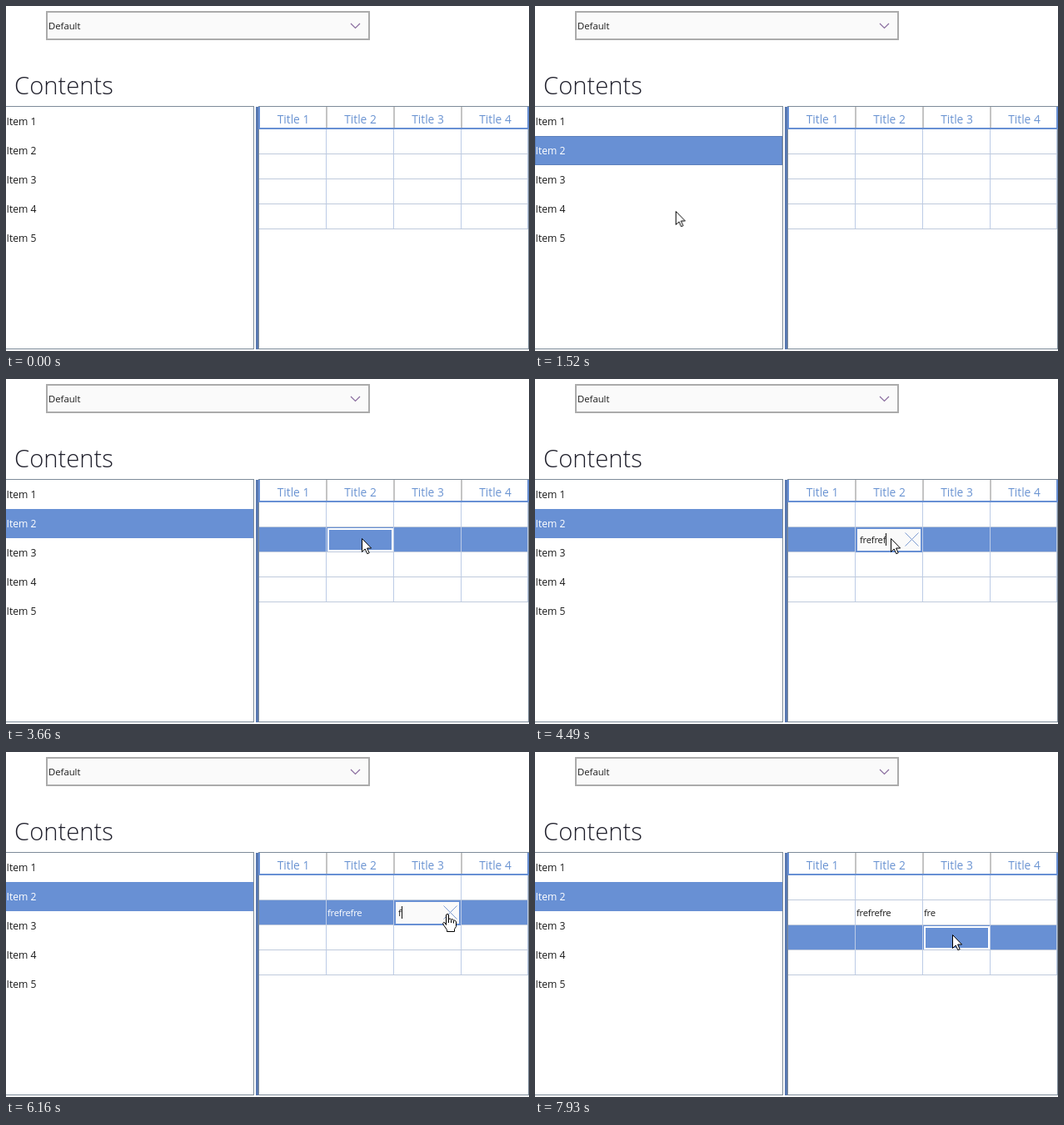
Recreate the animation shown at these times as an HTML page. Size 628 px wide and 414 px high, loop 8000 ms.

```html
<!DOCTYPE html>
<html lang="en">
<head>
<meta charset="utf-8">
<title>List and grid</title>
<style>
html, body { margin: 0; width: 100%; height: 100%; overflow: hidden; background: #fff; }
body { position: relative; font: 11.3px "Open Sans", "Noto Sans", sans-serif; }
svg { position: absolute; left: 0; top: 0; overflow: visible; }
text { fill: #1c1c1c; }
rect { shape-rendering: crispEdges; }
.lines { fill: none; stroke-width: 1; shape-rendering: crispEdges; }
.h1 { font-size: 29.2px; font-weight: 300; fill: #20202c; }
.item text { font-size: 12.2px; }
.head { font-size: 13.8px; fill: #6b94d2; text-anchor: middle; }
.cell { letter-spacing: -.25px; }
.blue { fill: #6890d4; }
.light text { fill: #fff; }
.focus { fill: none; stroke: #fff; stroke-width: 2; }

/* every state shares one 8 s clock */
.state { opacity: 0; animation: 8s step-end infinite; }
.item3 { animation-name: item3; }
.item2 { animation-name: item2; }
.ring { animation-name: ring; }
.row2 { animation-name: row2; }
.row3 { animation-name: row3; }
.focus22 { animation-name: focus22; }
.focus32 { animation-name: focus32; }
.focus23 { animation-name: focus23; }
.focus33 { animation-name: focus33; }
.edit2 { animation-name: edit2; }
.edit3 { animation-name: edit3; }
.word2 { animation-name: word2; }
.word3 { animation-name: focus33; }
.hand { animation-name: hand; }
.arrow { animation-name: arrow; }

@keyframes item3 { 0% { opacity: 0 } 7.4% { opacity: 1 } 16.4%, 100% { opacity: 0 } }
@keyframes item2 { 0% { opacity: 0 } 16.4%, 100% { opacity: 1 } }
@keyframes ring { 0% { opacity: 1 } 43.5%, 100% { opacity: 0 } }
@keyframes row2 {
  0% { opacity: 0 } 43.5% { opacity: 1 } 62.1% { opacity: 0 }
  69.2% { opacity: 1 } 95.6%, 100% { opacity: 0 }
}
@keyframes row3 {
  0% { opacity: 0 } 62.1% { opacity: 1 } 69.2% { opacity: 0 } 95.6%, 100% { opacity: 1 }
}
@keyframes focus22 { 0% { opacity: 0 } 43.5% { opacity: 1 } 47.6%, 100% { opacity: 0 } }
@keyframes edit2 { 0% { opacity: 0 } 47.6% { opacity: 1 } 62.1%, 100% { opacity: 0 } }
@keyframes focus32 { 0% { opacity: 0 } 62.1% { opacity: 1 } 69.2%, 100% { opacity: 0 } }
@keyframes focus23 { 0% { opacity: 0 } 69.2% { opacity: 1 } 73.5%, 100% { opacity: 0 } }
@keyframes edit3 { 0% { opacity: 0 } 73.5% { opacity: 1 } 95.6%, 100% { opacity: 0 } }
@keyframes focus33 { 0% { opacity: 0 } 95.6%, 100% { opacity: 1 } }
@keyframes word2 {
  0% { opacity: 0; fill: #1c1c1c } 62.1% { opacity: 1; fill: #1c1c1c }
  69.2% { opacity: 1; fill: #fff } 95.6%, 100% { opacity: 1; fill: #1c1c1c }
}
@keyframes hand { 0% { opacity: 0 } 76.1% { opacity: 1 } 88.5%, 100% { opacity: 0 } }
@keyframes arrow {
  0% { opacity: 0 } .88% { opacity: 1 } 76.1% { opacity: 0 } 88.5%, 100% { opacity: 1 }
}

.editor {
  position: absolute; top: 178px; width: 80px; height: 30px; box-sizing: border-box;
  padding-left: 3px; border: 2px solid #6890d4; background: #fafafa;
  color: #1c1c1c; line-height: 25px; white-space: nowrap; letter-spacing: -.25px;
}
.editor i, .editor svg {
  font-style: normal;
  animation: type 8s step-end infinite;
  animation-delay: calc(var(--at) - 8s);
}
.editor svg { left: 57px; top: 4px; }
.editor b { display: inline-block; width: 1px; height: 15px; background: #111; vertical-align: -3px; }
@keyframes type {
  0% { font-size: 11.3px; opacity: 1 }
  50%, 100% { font-size: 0; opacity: 0 }
}

.pointer { animation: move 8s linear infinite; }
.pointer path { stroke: #000; stroke-width: 1; fill: #fff; }
@keyframes move {
  0%, .9% { transform: translate(183px, 313px) }
  3% { transform: translate(170px, 272px) }
  6.5% { transform: translate(92px, 200px) }
  7.4% { transform: translate(90px, 196px) }
  10.2%, 12.8% { transform: translate(96px, 184px) }
  14.6%, 16.9% { transform: translate(98px, 172px) }
  19.5% { transform: translate(185px, 263px) }
  20.6% { transform: translate(220px, 250px) }
  22.5%, 23.2% { transform: translate(251px, 218px) }
  28.6%, 30.2% { transform: translate(399px, 186px) }
  32%, 38.6% { transform: translate(423px, 186px) }
  38.63%, 40.7% { transform: translate(431px, 199px) }
  41.8%, 58% { transform: translate(427px, 191px) }
  60.5%, 62.1% { transform: translate(449px, 223px) }
  64.7%, 65.6% { transform: translate(441px, 207px) }
  68.5% { transform: translate(490px, 196px) }
  71.7%, 87.5% { transform: translate(530px, 194px) }
  92%, 93% { transform: translate(505px, 197px) }
  95%, 100% { transform: translate(501px, 219px) }
}
</style>
</head>
<body>
<svg width="628" height="414" viewBox="0 0 628 414">
  <!-- drop-down and heading -->
  <rect x="49" y="7" width="387" height="33" fill="#fafafa" stroke="#ababab" stroke-width="2"/>
  <text x="51" y="28">Default</text>
  <path d="M414 21l5.5 5.5 5.5-5.5" fill="none" stroke="#8a6d9f" stroke-width="1.2"/>
  <text class="h1" x="10" y="106">Contents</text>

  <!-- list -->
  <g class="item">
    <text x="0.5" y="143">Item 1</text>
    <text x="0.5" y="178">Item 2</text>
    <text x="0.5" y="213">Item 3</text>
    <text x="0.5" y="248">Item 4</text>
    <text x="0.5" y="283">Item 5</text>
    <g class="state item3 light">
      <rect class="blue" y="191" width="297" height="35"/>
      <rect x=".5" y="191.5" width="296" height="34" fill="none" stroke="#5c7fbb"/>
      <text x="0.5" y="213">Item 3</text>
    </g>
    <g class="state item2 light">
      <rect class="blue" y="156" width="297" height="35"/>
      <rect class="state ring" x=".5" y="156.5" width="296" height="34" fill="none" stroke="#5c7fbb"/>
      <text x="0.5" y="178">Item 2</text>
    </g>
  </g>
  <path class="lines" stroke="#7d8b99" d="M0 120.5H297.5V411.5H0M303 120.5H627.5V411.5H303.5V148"/>
  <rect x="300" y="121" width="3" height="291" fill="#5878b0"/>

  <!-- grid -->
  <rect class="state row2 blue" x="304" y="178" width="323" height="29"/>
  <rect class="state row3 blue" x="304" y="208" width="323" height="29"/>
  <path class="lines" stroke="#bccbe6" d="M384.5 148V268M465.5 148V268M546.5 148V268M626.5 148V268"/>
  <path class="lines" stroke="#c0cbdc" d="M304 177.5H627M304 207.5H627M304 237.5H627M304 267.5H627"/>
  <path class="lines" stroke="#c4c4c4" style="stroke-width:2" d="M385 121V146M466 121V146M547 121V146"/>
  <path class="lines" stroke="#6890d4" style="stroke-width:2" d="M304 121V147H627V121"/>
  <g class="headings">
    <text class="head" x="345" y="141">Title 1</text>
    <text class="head" x="425.5" y="141">Title 2</text>
    <text class="head" x="506.5" y="141">Title 3</text>
    <text class="head" x="587.5" y="141">Title 4</text>
  </g>
  <rect class="state focus22 focus" x="387" y="180" width="77" height="26"/>
  <rect class="state focus32 focus" x="387" y="210" width="77" height="26"/>
  <rect class="state focus23 focus" x="468" y="180" width="77" height="26"/>
  <rect class="state focus33 focus" x="468" y="210" width="77" height="26"/>
  <text class="state word2 cell" x="386" y="197">frefrefre</text>
  <text class="state word3 cell" x="467" y="197">fre</text>
</svg>

<div class="state edit2 editor" style="left:385px"><i style="--at:4.07s">f</i><i style="--at:4.14s">r</i><i style="--at:4.21s">e</i><i style="--at:4.28s">f</i><i style="--at:4.35s">r</i><i style="--at:4.42s">e</i><i style="--at:4.49s">f</i><i style="--at:4.56s">r</i><i style="--at:4.63s">e</i><b></b>
  <svg style="--at:4.07s" width="17" height="17"><path d="M.5 .5l16 16M16.5 .5l-16 16" stroke="#7d9bd0"/></svg>
</div>
<div class="state edit3 editor" style="left:466px"><i style="--at:6.09s">f</i><i style="--at:6.62s">r</i><i style="--at:6.76s">e</i><b></b>
  <svg style="--at:6.09s" width="17" height="17"><path d="M.5 .5l16 16M16.5 .5l-16 16" stroke="#7d9bd0"/></svg>
</div>

<svg width="628" height="414" viewBox="0 0 628 414">
  <g class="pointer">
    <path class="state arrow" d="M.5 .5V16.5L4.2 13 6.8 18.7 9.2 17.7 6.6 12H11.6Z"/>
    <g class="state hand">
      <path d="M-1.5 13.5V2Q-1.5 .5 0 .5T1.5 2V7Q2 5.8 3.2 6T4.5 7.5Q5 6.4 6.2 6.8T7.5 8.4Q8.2 7.6 9.2 8.2T10.5 10V15.5L8.5 18.5V21.5H-.5V19.5L-5 13Q-5.8 11-4.4 10.4T-1.5 13.5Z"/>
      <path d="M1.5 7V11M4.5 8V11M7.5 9V11.5" fill="none"/>
    </g>
  </g>
</svg>
</body>
</html>
```
